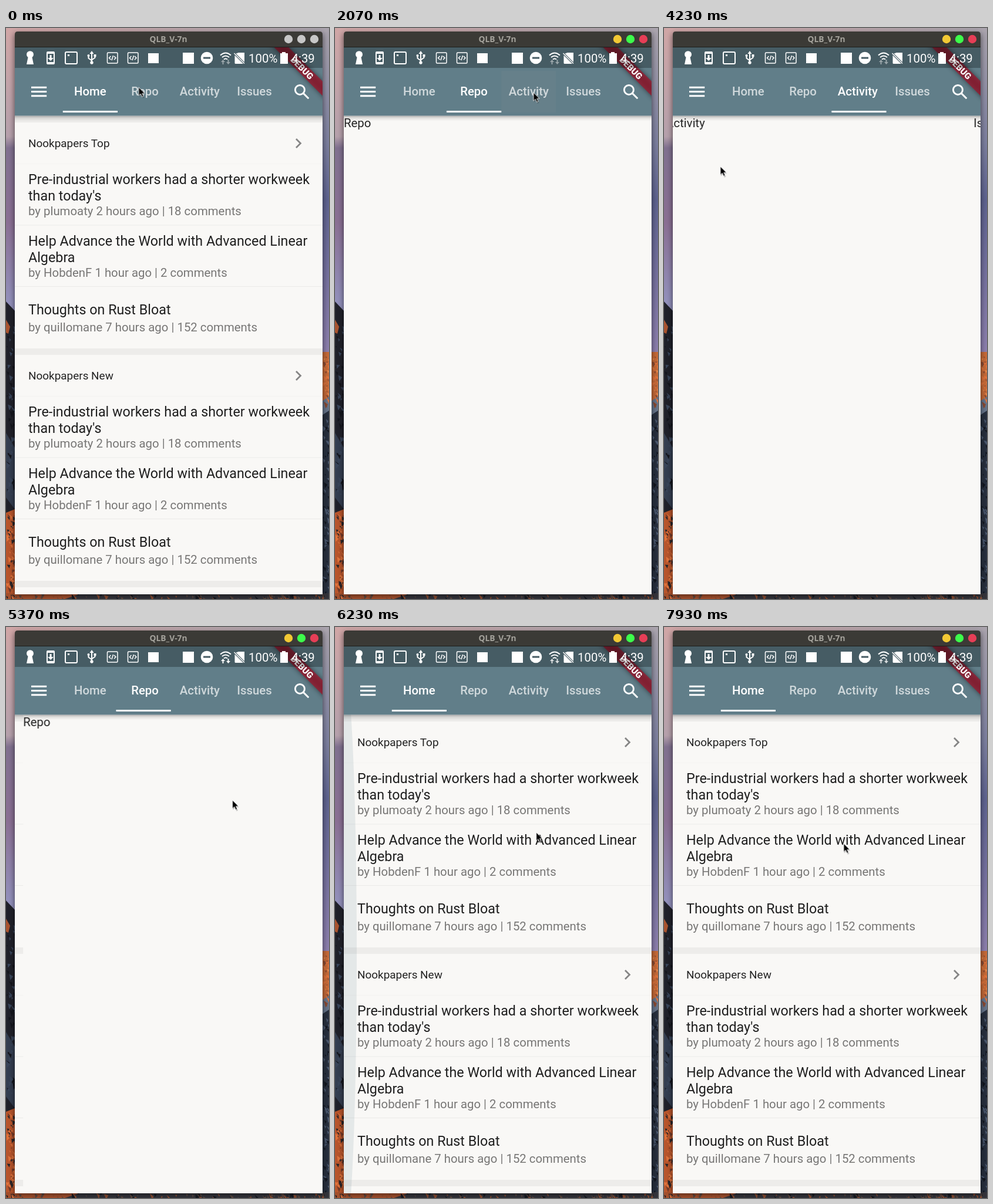
Animation, 550 px wide and 973 px high, one loop 8 s. Source, as an HTML page:

```html
<!DOCTYPE html>
<html lang="en">
<head>
<meta charset="utf-8">
<title>Tabbed reader</title>
<style>
html, body { margin: 0; width: 100%; height: 100%; overflow: hidden; background: #8e8598; }
svg { display: block; width: 550px; height: 973px; font-family: Roboto, sans-serif; }
.title { font: 700 13.8px "Open Sans", sans-serif; fill: #a5a39c; }
.head { font-size: 18.93px; fill: #222; }
.story { font-size: 23.3px; fill: #1f1f1f; }
.meta { font-size: 20.38px; fill: #777675; }
.page { font-size: 20.38px; fill: #222; }
.tab { font-size: 20.38px; font-weight: 500; fill: #fff; }
.line { fill: none; stroke: #fff; stroke-width: 2; }
.thin { stroke-width: 1.5; }
.status { font-size: 20.4px; fill: #fff; }
</style>
</head>
<body>
<svg viewBox="0 0 550 973" xmlns="http://www.w3.org/2000/svg">
  <defs>
    <linearGradient id="skyLeft" x2="0" y2="1">
      <stop offset="0" stop-color="#d0a6a6"/><stop offset=".19" stop-color="#b5a0ab"/>
      <stop offset=".21" stop-color="#80708f"/><stop offset=".34" stop-color="#8a6f93"/>
      <stop offset=".48" stop-color="#9290bb"/>
    </linearGradient>
    <linearGradient id="skyRight" x2="0" y2="1">
      <stop offset="0" stop-color="#a9a3ad"/><stop offset=".2" stop-color="#7c7f9f"/>
      <stop offset=".3" stop-color="#5e6390"/><stop offset=".57" stop-color="#8d7fae"/>
    </linearGradient>
    <linearGradient id="skyTop">
      <stop offset="0" stop-color="#d0a6a6"/><stop offset="1" stop-color="#a9a3ad"/>
    </linearGradient>
    <linearGradient id="drop" x2="0" y2="1">
      <stop offset="0" stop-opacity=".3"/><stop offset=".4" stop-opacity=".1"/><stop offset="1" stop-opacity="0"/>
    </linearGradient>
    <filter id="soft" x="-10%" y="-10%" width="120%" height="120%"><feGaussianBlur stdDeviation="5"/></filter>
    <filter id="bannerBlur" x="-20%" y="-100%" width="140%" height="300%"><feGaussianBlur stdDeviation="4"/></filter>
    <clipPath id="screen"><rect x="15" y="33" width="524" height="932"/></clipPath>
    <clipPath id="body"><rect x="15" y="149.5" width="524" height="815.5"/></clipPath>
  </defs>

  <g id="wallpaper">
    <rect width="275" height="973" fill="url(#skyLeft)"/>
    <rect x="275" width="275" height="973" fill="url(#skyRight)"/>
    <rect width="550" height="7" fill="url(#skyTop)"/>
    <path d="M0 466L16 483V973H0z" fill="#20212a"/>
    <path d="M0 497l7 12-3 12-4-2z" fill="#a9532f"/>
    <path d="M0 690l15 25V820L0 800z" fill="#343e50"/>
    <path d="M0 826l15-6V973H0z" fill="#b8552c"/>
    <path d="M538 552h12v84l-12 8z" fill="#c66a38"/>
    <path d="M538 636l12-8v30l-12 6z" fill="#66748a"/>
    <path d="M538 660l12-8V973H538z" fill="#272f3e"/>
    <path d="M0 963H550V973H0z" fill="#33333a"/>
    <path d="M0 963H130l-30 10H0z" fill="#a34f2c"/>
    <g id="rocks"></g>
  </g>

  <rect x="14" y="9" width="526" height="958" rx="5" opacity=".5" filter="url(#soft)"/>
  <path d="M15 965V11q0-5 5-5H534q5 0 5 5V965z" fill="#3b3a36"/>
  <rect x="15" y="32" width="524" height="1" fill="#1d1d1b"/>
  <text class="title" x="276.5" y="24" text-anchor="middle">QLB_V-7n</text>
  <g id="buttons"></g>

  <rect x="15" y="33" width="524" height="932" fill="#f9f8f6"/>
  <g clip-path="url(#body)">
    <g id="track"></g>
    <ellipse id="glow" cx="15" cy="557" rx="22" ry="490" fill="#607d8b" fill-opacity=".13"/>
  </g>

  <rect x="15" y="149.5" width="524" height="9" fill="url(#drop)"/>
  <rect x="15" y="33" width="524" height="116.5" fill="#617e89"/>
  <g id="tabs"></g>
  <rect id="indicator" x="96.8" y="141" width="93.2" height="3" fill="#fff"/>
  <path class="line" d="M43 101.2h26.2M43 108.5h26.2M43 115.8h26.2" style="stroke-width:3"/>
  <g class="line" transform="translate(486.6 91.6) scale(1.456)">
    <circle cx="9.5" cy="9.5" r="5.5"/><path d="M13.6 13.6l6.1 6.1"/>
  </g>

  <g clip-path="url(#screen)">
    <g transform="translate(539 33) rotate(45)">
      <rect x="-70" y="40.8" width="140" height="17.5" opacity=".5" filter="url(#bannerBlur)"/>
      <rect x="-70" y="40.8" width="140" height="17.5" fill="#a3122a" fill-opacity=".7"/>
      <text y="54.8" text-anchor="middle" font-size="14.85" font-weight="900" fill="#fff">DEBUG</text>
    </g>
  </g>
  <rect x="15" y="33" width="524" height="35" opacity=".27"/>

  <g fill="#fff">
    <path d="M37.5 50a6 6 0 1 1 7 0L47 62H35z"/>
    <path d="M71 40h10q2 0 2 2V60q0 2-2 2H71q-2 0-2-2V42q0-2 2-2zM71 44V58H81V44zM74.5 46h3v5H81l-5 5-5-5h3.5z" fill-rule="evenodd"/>
    <rect class="line" x="101" y="41" width="20" height="20" rx="2"/><rect x="105" y="45" width="3" height="3"/>
    <path class="line" d="M146 43V59M140.5 47v4.5l5.5 4M151.5 47v3.5l-5.5 4"/>
    <path d="M146 39l3.5 5h-7z"/><circle cx="146" cy="59" r="2.7"/><circle cx="140.5" cy="47" r="2"/><rect x="149.5" y="45" width="4" height="4"/>
    <g id="codeIcons"></g>
    <rect x="242" y="43" width="18" height="17"/>
    <rect x="301" y="42" width="19" height="19"/>
    <circle cx="342" cy="51" r="10.3"/><rect x="336" y="49.5" width="12" height="3" fill="#475c64"/>
    <path class="line" d="M365 46.5q9-8 18 0M368 50q6-5 12 0M371 53.5q3-2.5 6 0"/>
    <path id="traffic" d="M366 58l3.5-4 3.5 4h-2.5v4h-2v-4zM375 58h2.5v-4h2v4h2.5l-3.5 4z"/>
    <path d="M396 42h10V58L391.5 43.5zM389.5 46.5L404 61H391q-1.5 0-1.5-1.5z"/>
    <path class="line thin" d="M388.5 43L406 60.5"/>
    <path d="M470 43V41h6v2h4V61H467V43z"/>
  </g>
  <text class="status" x="413" y="59">100%</text>
  <text class="status" x="486.5" y="59">4:39</text>

  <g id="cursor">
    <g transform="scale(.86)">
      <path d="M1 2V19l4-3.5 3 6 3-1.5-3-6h5z" opacity=".25"/>
      <path d="M0 0V16.500l3.800-3.500 2.700 6 3-1.300-2.700-5.700H12z" stroke="#fff"/>
    </g>
  </g>
</svg>

<script>
const LOOP = 8000, PAGE = 524, TAB = 93.2, EDGE = 15;
const $ = id => document.getElementById(id);

function add(parent, name, attrs = {}, text = '') {
  const el = document.createElementNS('http://www.w3.org/2000/svg', name);
  for (const key in attrs) el.setAttribute(key, attrs[key]);
  el.textContent = text;
  return parent.appendChild(el);
}

// steps: [ms, value, easing towards the next step]
function play(el, steps, style) {
  const last = steps[steps.length - 1];
  const frames = [...steps, [LOOP, last[1]]].map(([ms, value, easing = 'linear']) =>
    ({ offset: ms / LOOP, easing, ...style(value) }));
  el.animate(frames, { duration: LOOP, iterations: Infinity });
}
const opacity = value => ({ opacity: value });
const move = (x, y) => ({ transform: `translate(${x}px, ${y}px)` });

// Wallpaper texture along the window's edges
let seed = 7;
const random = () => (seed = seed * 16807 % 2147483647) / 2147483647;
function rocks(count, x, y, w, h, colors) {
  for (let i = 0; i < count; i++) {
    const px = x + random() * w, py = y + random() * h, s = 2 + random() * 5;
    add($('rocks'), 'path', {
      d: `M${px} ${py}l${s} ${s * random()}l${-s * random()} ${s}z`,
      fill: colors[Math.floor(random() * colors.length)]
    });
  }
}
rocks(50, 0, 500, 13, 310, ['#14161d', '#39455a']);
rocks(60, 0, 825, 13, 145, ['#e0733c', '#2a2528', '#743b29']);
rocks(30, 539, 560, 10, 80, ['#e58a4d', '#8a4a32', '#e0733c']);
rocks(60, 539, 665, 10, 300, ['#12161f', '#4a586f']);
rocks(90, 0, 964, 550, 7, ['#15181f', '#59463f', '#8b4c30']);

// Window buttons gain colour with focus
['#f2c834', '#3dfc4b', '#e63e56'].forEach((color, i) => {
  const button = add($('buttons'), 'circle', { cx: 481 + i * 22, cy: 19, r: 7.2, fill: color });
  play(button, [[0, '#c7c7c7', 'step-end'], [980, color]], fill => ({ fill }));
});

for (const x of [172, 207]) {
  add($('codeIcons'), 'rect', { class: 'line thin', x: x + .5, y: 42, width: 17.5, height: 18, rx: 1.5 });
  add($('codeIcons'), 'path', { class: 'line thin', d: `M${x + 6.5} 48l-3 3 3 3M${x + 12} 48l3 3-3 3M${x + 10.5} 47l-2.5 8` });
}

// Pages
const names = ['Home', 'Repo', 'Activity', 'Issues'];
const track = $('track');
const label = (cls, x, y, text) => add(track, 'text', { class: cls, x, y }, text);
const bar = (y, height, fill) => add(track, 'rect', { x: EDGE, y, width: PAGE, height, fill });

function section(top, name) {
  bar(top, 11, '#edecea');
  label('head', 38, top + 53.3, name);
  add(track, 'path', { d: `M494 ${top + 39}l7.5 7.5-7.5 7.5`, fill: 'none', stroke: '#858585', 'stroke-width': 2.8 });
  bar(top + 81, 1, '#f4f3f1');
  bar(top + 185.5, 1, '#ecebe9');
  bar(top + 290, 1, '#ecebe9');
  label('story', 38, top + 116, 'Pre-industrial workers had a shorter workweek');
  label('story', 38, top + 143.7, "than today's");
  label('meta', 38, top + 168.5, 'by plumoaty 2 hours ago | 18 comments');
  label('story', 38, top + 221, 'Help Advance the World with Advanced Linear');
  label('story', 38, top + 248.7, 'Algebra');
  label('meta', 38, top + 273.5, 'by HobdenF 1 hour ago | 2 comments');
  label('story', 38, top + 338, 'Thoughts on Rust Bloat');
  label('meta', 38, top + 366.5, 'by quillomane 7 hours ago | 152 comments');
}
section(150, 'Nookpapers Top');
section(546, 'Nookpapers New');
bar(942, 11, '#edecea');
names.slice(1).forEach((name, i) => label('page', EDGE + PAGE * (i + 1), 168.5, name));

// Tab position over time; the last tapped page trails its indicator
const taps = [[0, 0], [1180, 0, 'ease'], [1480, 1], [2110, 1, 'ease'], [2410, 2]];
const swipes = [
  [3560, 3, 'ease-in'], [3800, 2.45, 'ease-out'], [4230, 2.023], [4330, 2],
  [4430, 2, 'ease-in'], [4680, 1.5, 'ease-out'], [5030, 1],
  [5320, 1], [5370, .975], [5560, .6, 'ease-out'], [5880, 0]
];
const pageSteps = [...taps, [3121, 2, 'ease'], [3421, 3], ...swipes];
const tabSteps = [...taps, [2960, 2, 'ease'], [3260, 3], ...swipes];
play(track, pageSteps, p => move(-p * PAGE, 0));
play($('indicator'), tabSteps, p => move(p * TAB, 0));

const presses = {
  Repo: [[0, 0], [1050, 0], [1150, .7], [1330, .7], [1530, 0]],
  Activity: [[0, 0], [2000, 0], [2070, .5], [2150, .9], [2300, .9], [2500, 0]],
  Issues: [[0, 0], [2900, 0], [3000, 1], [3270, 1], [3450, 0]]
};
names.forEach((name, i) => {
  const x = 96.8 + i * TAB;
  if (presses[name]) {
    const ripple = add($('tabs'), 'rect', { x, y: 73, width: TAB, height: 71, fill: '#949494', 'fill-opacity': .22 });
    play(ripple, presses[name], opacity);
  }
  const text = add($('tabs'), 'text', { class: 'tab', x: x + TAB / 2, y: 114.8, 'text-anchor': 'middle' }, name);
  play(text, tabSteps, p => opacity(1 - .3 * Math.min(1, Math.abs(p - i))));
});

play($('glow'), [[0, 0], [6130, 0], [6230, 1], [6380, 1, 'ease-out'], [6850, 0]], opacity);
play($('traffic'), [[0, .45, 'step-end'], [5200, 1, 'step-end'], [6100, .8]], opacity);

const soft = 'ease-in-out';
play($('cursor'), [
  [0, [226, 101]], [100, [226, 101], soft], [700, [236, 107]], [1450, [236, 107], soft],
  [1950, [338, 110]], [2200, [338, 110], soft], [2700, [424, 108]], [3000, [424, 108], 'ease-in'],
  [3270, [291, 231], 'ease-out'], [3480, [110, 240]], [3550, [110, 240], soft],
  [3820, [340, 246], soft], [4230, [96, 236]], [4420, [96, 236], soft],
  [4720, [370, 262], soft], [5130, [345, 288]], [5290, [352, 291]], [5370, [385, 295]],
  [5580, [500, 318], soft], [6030, [230, 344], 'ease-in'], [6230, [342, 350], 'ease-out'],
  [6400, [420, 355], soft], [6950, [330, 366], soft], [7700, [306, 369]]
], ([x, y]) => move(x, y));
</script>
</body>
</html>
```
